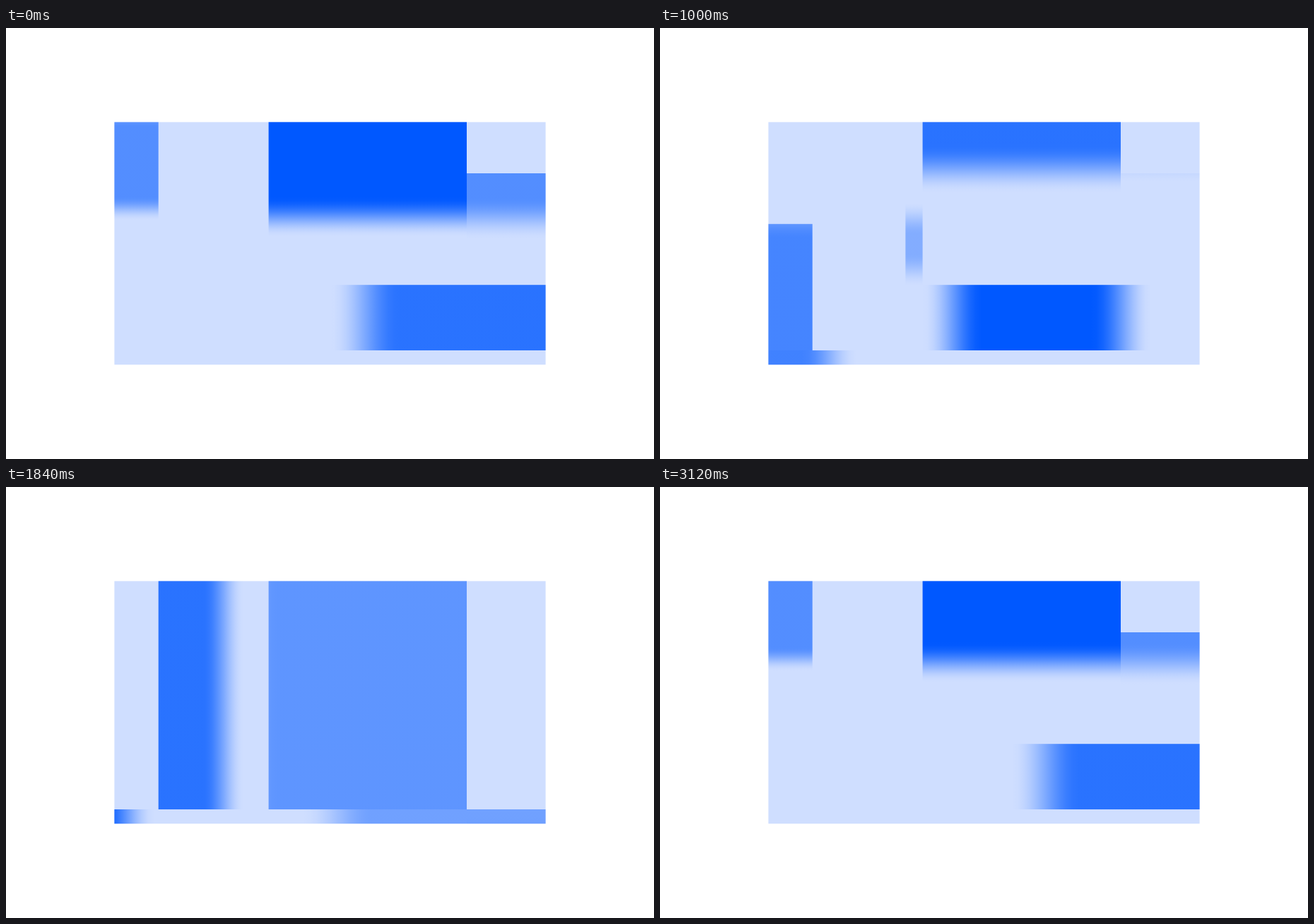
These frames come from a looping animation (917 by 611 pixels, 3160 ms). An HTML page with a canvas:

```html
<!DOCTYPE html>
<html lang="en">
<head>
<meta charset="utf-8">
<style>
html, body { margin: 0; width: 100%; height: 100%; overflow: hidden; background: #fff; }
canvas { display: block; }
</style>
</head>
<body>
<canvas id="stage" width="917" height="611"></canvas>
<script>
const ctx = document.getElementById('stage').getContext('2d');
const LOOP = 3160, STEP = 40, STOPS = 64;
const BLUE = '0,88,255', PALE = '#cfdeff';

// Speeds in pixels per millisecond
const DRIFT = 0.3, SLOW = 0.48, CRUISE = 0.7, FAST = 0.95;
// Strength of the blue
const FULL = 1, STRONG = 0.8, HALF = 0.6, WEAK = 0.28;
// Extra softness gained over one lifetime
const SPREAD = 35;

// Grid lines of the mosaic
const X = [153.4, 215.7, 371.6, 652, 763.6];
const Y = [133.4, 206, 277.8, 364.2, 457, 477.3];
const cell = (c0, r0, c1, r1) => ({ x0: X[c0], y0: Y[r0], x1: X[c1], y1: Y[r1] });

const leftTop = cell(0, 0, 1, 2), leftLow = cell(0, 2, 1, 4);
const second = cell(1, 0, 2, 3), secondTall = cell(1, 0, 2, 4);
const middle = cell(2, 0, 3, 4), right = cell(3, 1, 4, 5);
const topRow = cell(2, 0, 4, 1), lowRow = cell(1, 3, 4, 4), strip = cell(0, 4, 4, 5);
const sliver = { ...cell(1, 1, 2, 3), x0: 347.4 };

// A soft band glides through its cell. Its front edge is at `head` at `time`;
// from then on it grows paler and softer until its life ends.
const bands = [];
const band = (axis, sign) => (box, time, head, length, speed, alpha, soft, life = Infinity) =>
  bands.push({ axis, sign, box, time, head, length, speed, alpha, soft, life });
const down = band('y', 1), rightward = band('x', 1), leftward = band('x', -1);

rightward(middle, 2760, 617, 251, FAST, WEAK, 50);
down(middle, 1000, 200, 342, CRUISE, STRONG, 34, 840);
down(middle, 0, 268, 198, SLOW, FULL, 28, 840);
rightward(middle, 1520, 480, 366, CRUISE, STRONG, 34, 1000);

down(second, 680, 299, 185, FAST, FULL, 38);
down(sliver, 1000, 343, 73, SLOW, 0.37, 24);
rightward(secondTall, 2200, 560, 320, CRUISE, STRONG, 29);
rightward(secondTall, 2760, 480, 330, CRUISE, WEAK, 30);

down(leftTop, 0, 256, 133, DRIFT, HALF, 17);
down(leftTop, 2200, 257, 225, SLOW, WEAK, 25);
down(leftLow, 680, 322, 284, CRUISE, 0.94, 27, 1100);

down(right, 0, 270, 232, SLOW, HALF, 30);
down(right, 1520, 545, 263, CRUISE, HALF, 38);

leftward(topRow, 680, 433, 149, FAST, FULL, 45);
leftward(topRow, 2200, 679, 245, FAST, 0.9, 18, 660);
leftward(lowRow, 0, 508, 466, FAST, STRONG, 48, 1330);
leftward(lowRow, 1000, 415, 238, FAST, FULL, 42);
rightward(strip, 1000, 240, 569, FAST, 0.69, 38, 2500);
rightward(strip, 2200, 514, 464, FAST, FULL, 37, 1140);

const ramp = v => {
  v = Math.max(0, Math.min(1, v));
  return v * v * (3 - 2 * v);
};

// Signed time since a moment, taking the nearer way round the loop
const since = (t, moment) => {
  const d = (t - moment + LOOP * 1.5) % LOOP;
  return d - LOOP / 2;
};

function paint(b, t) {
  const { x0, y0, x1, y1 } = b.box;
  const flat = b.axis === 'x';
  const from = flat ? x0 : y0, to = flat ? x1 : y1;
  const dt = since(t, b.time), age = Math.max(0, dt) / b.life;
  if (age >= 1) return;

  const head = b.head + b.sign * b.speed * dt, tail = head - b.sign * b.length;
  const lo = Math.min(head, tail), hi = Math.max(head, tail);
  const soft = b.soft + SPREAD * age, alpha = b.alpha * (1 - age);
  if (hi + soft < from || lo - soft > to) return;

  const g = flat ? ctx.createLinearGradient(x0, 0, x1, 0)
                 : ctx.createLinearGradient(0, y0, 0, y1);
  for (let i = 0; i <= STOPS; i++) {
    const p = from + (to - from) * i / STOPS;
    const a = alpha * ramp((p - lo + soft) / (2 * soft)) * ramp((hi + soft - p) / (2 * soft));
    g.addColorStop(i / STOPS, `rgba(${BLUE},${a.toFixed(4)})`);
  }
  ctx.fillStyle = g;
  ctx.fillRect(x0, y0, x1 - x0, y1 - y0);
}

function draw(now) {
  let t = Math.floor((now % LOOP) / STEP) * STEP;
  if (t < 2 * STEP) t = 0;
  ctx.fillStyle = '#fff';
  ctx.fillRect(0, 0, 917, 611);
  ctx.fillStyle = PALE;
  ctx.fillRect(X[0], Y[0], X[4] - X[0], Y[5] - Y[0]);
  for (const b of bands) paint(b, t);
}

const start = performance.now();
function tick() {
  draw(performance.now() - start);
  requestAnimationFrame(tick);
}
tick();
</script>
</body>
</html>
```
